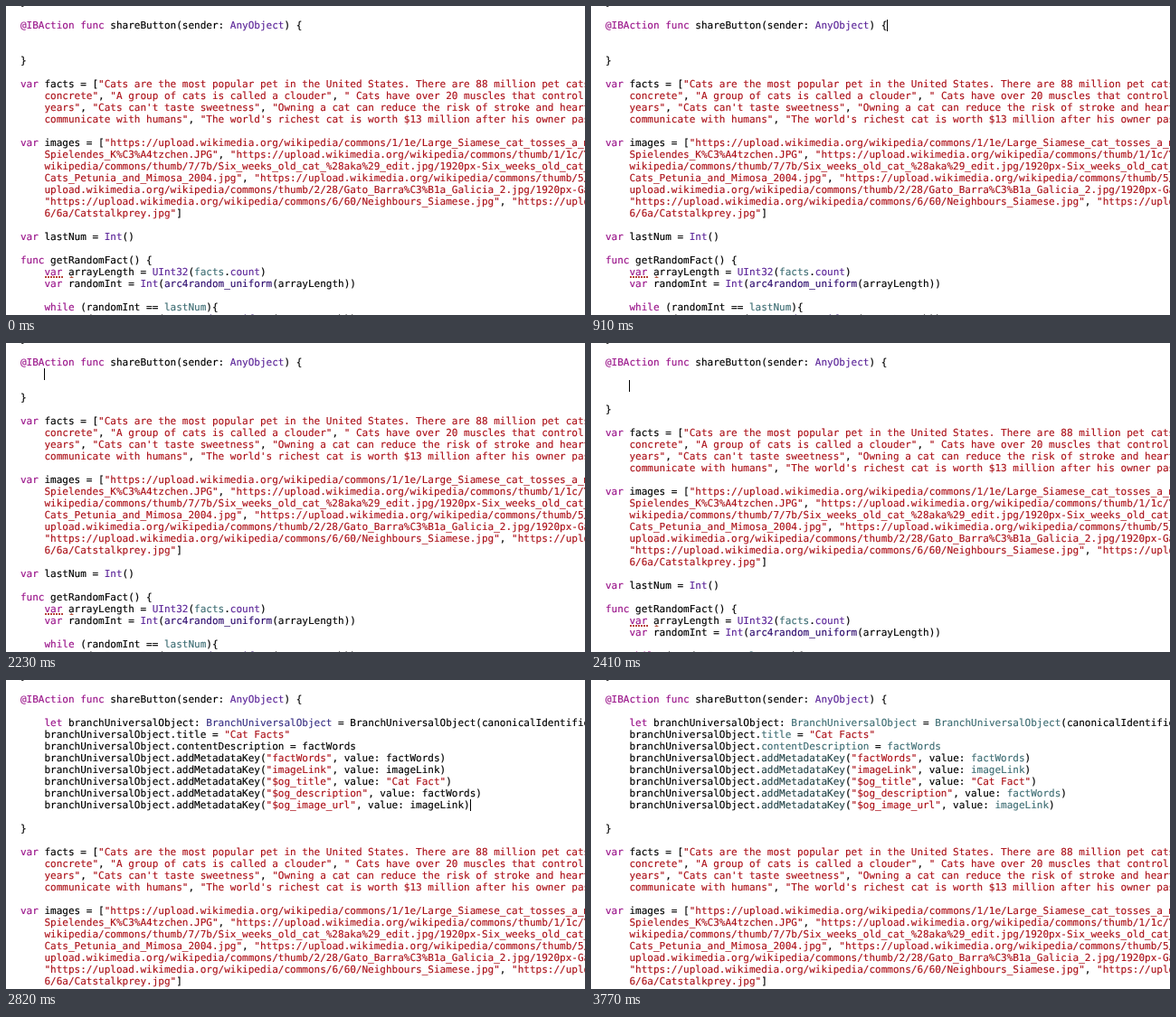
An HTML page that plays this animation: 640x342 px, repeating every 3.81 s.

```html
<!DOCTYPE html>
<html lang="en">
<head>
<meta charset="utf-8">
<title>Code editor</title>
<style>
  html, body { margin: 0; width: 100%; height: 100%; overflow: hidden; background: #fff; }
  #stage { position: relative; width: 100%; height: 100%; overflow: hidden; contain: strict; }
  #editor {
    position: absolute; left: 16px; top: -11px;
    font: 11px/13px "DejaVu Sans Mono", monospace;
    text-rendering: geometricPrecision; font-variant-ligatures: none;
    white-space: pre; color: #000; -webkit-text-stroke: .15px;
  }
  .string { color: #ac121a; }
  .keyword { color: #9a148a; }
  .system { color: #5c2699; }
  .call { color: #2e0d6e; }
  .type, .member { color: #3f6e74; }
  .method { color: #26474b; }
  .plain .member, .plain .method { color: #000; }
  .plain .type { color: #3a3285; }
  .warn { position: relative; }
  .warn::before, .warn::after { content: ""; position: absolute; height: 2px; top: 11px; }
  .warn::before {
    left: 0; width: 20px;
    background: repeating-linear-gradient(90deg, #b8433a 0 2px, transparent 2px 3px);
  }
  .warn::after {
    left: 27.5px; width: 5px; background: #b5503a;
    clip-path: polygon(50% 0, 100% 100%, 0 100%);
  }
  #caret { position: absolute; width: 1px; height: 13px; background: #000; }
</style>
</head>
<body>
<div id="stage"><div id="editor"><div id="code"></div><div id="caret"></div></div></div>
<script>
const LOOP = 3810;

const head = `}

@IBAction func shareButton(sender: AnyObject) {
`;

const pasted = `
    let branchUniversalObject: BranchUniversalObject = BranchUniversalObject(canonicalIdentifier: "cat")
    branchUniversalObject.title = "Cat Facts"
    branchUniversalObject.contentDescription = factWords
    branchUniversalObject.addMetadataKey("factWords", value: factWords)
    branchUniversalObject.addMetadataKey("imageLink", value: imageLink)
    branchUniversalObject.addMetadataKey("$og_title", value: "Cat Fact")
    branchUniversalObject.addMetadataKey("$og_description", value: factWords)
    branchUniversalObject.addMetadataKey("$og_image_url", value: imageLink)

`;

const tail = `}

var facts = ["Cats are the most popular pet in the United States. There are 88 million pet cats
    concrete", "A group of cats is called a clouder", " Cats have over 20 muscles that control
    years", "Cats can't taste sweetness", "Owning a cat can reduce the risk of stroke and heart
    communicate with humans", "The world's richest cat is worth $13 million after his owner passed"]

var images = ["https://upload.wikimedia.org/wikipedia/commons/1/1e/Large_Siamese_cat_tosses_a_mouse
    Spielendes_K%C3%A4tzchen.JPG", "https://upload.wikimedia.org/wikipedia/commons/thumb/1/1c/Y
    wikipedia/commons/thumb/7/7b/Six_weeks_old_cat_%28aka%29_edit.jpg/1920px-Six_weeks_old_cat_
    Cats_Petunia_and_Mimosa_2004.jpg", "https://upload.wikimedia.org/wikipedia/commons/thumb/5/5
    upload.wikimedia.org/wikipedia/commons/thumb/2/28/Gato_Barra%C3%B1a_Galicia_2.jpg/1920px-Gato",
    "https://upload.wikimedia.org/wikipedia/commons/6/60/Neighbours_Siamese.jpg", "https://upload
    6/6a/Catstalkprey.jpg"]

var lastNum = Int()

func getRandomFact() {
    var arrayLength = UInt32(facts.count)
    var randomInt = Int(arc4random_uniform(arrayLength))

    while (randomInt == lastNum){
        randomInt = Int(arc4random_uniform(arrayLength))
    }`;

const token = new RegExp([
  /(?<string>"[^"]*")/,
  /(?<warn>var(?= arrayLength))/,
  /(?<keyword>@IBAction|\b(?:func|var|let|while)\b)/,
  /(?<system>\b(?:AnyObject|U?Int(?:32)?|count)\b)/,
  /(?<call>\barc4random_uniform\b)/,
  /(?<type>(?<=: )BranchUniversalObject\b)/,
  /(?<method>\baddMetadataKey\b)/,
  /(?<member>\b(?:BranchUniversalObject|title|contentDescription|factWords|imageLink)\b|\bfacts(?=\.)|(?<=== )lastNum)/
].map(part => part.source).join("|"), "g");

const highlight = text => text.replace(token, (match, ...args) => {
  const groups = args.at(-1);
  const kind = Object.keys(groups).find(name => groups[name] !== undefined);
  return `<span class="${kind === "warn" ? "warn keyword" : kind}">${match}</span>`;
});

// caret: [row, column]
const steps = [
  { at: 0, body: "\n\n" },
  { at: 750, body: "\n\n", caret: [2, 47] },
  { at: 1400, body: "\n\n", caret: [3, 4] },
  { at: 2320, body: "\n\n\n", caret: [4, 4] },
  { at: 2770, body: pasted, caret: [11, 75], plain: true },
  { at: 2950, body: pasted, caret: [11, 75] },
  { at: 3500, body: pasted }
];

const code = document.getElementById("code");
const caret = document.getElementById("caret");
let shown;

function show({ body, caret: place, plain }) {
  code.innerHTML = highlight(head + body + tail);
  code.className = plain ? "plain" : "";
  caret.hidden = !place;
  if (!place) return;
  caret.style.top = place[0] * 13 + "px";
  caret.style.left = place[1] + "ch";
}

function tick() {
  const time = performance.now() % LOOP;
  const step = steps.findLast(({ at }) => at <= time);
  if (step !== shown) show(shown = step);
  requestAnimationFrame(tick);
}
tick();
</script>
</body>
</html>
```
